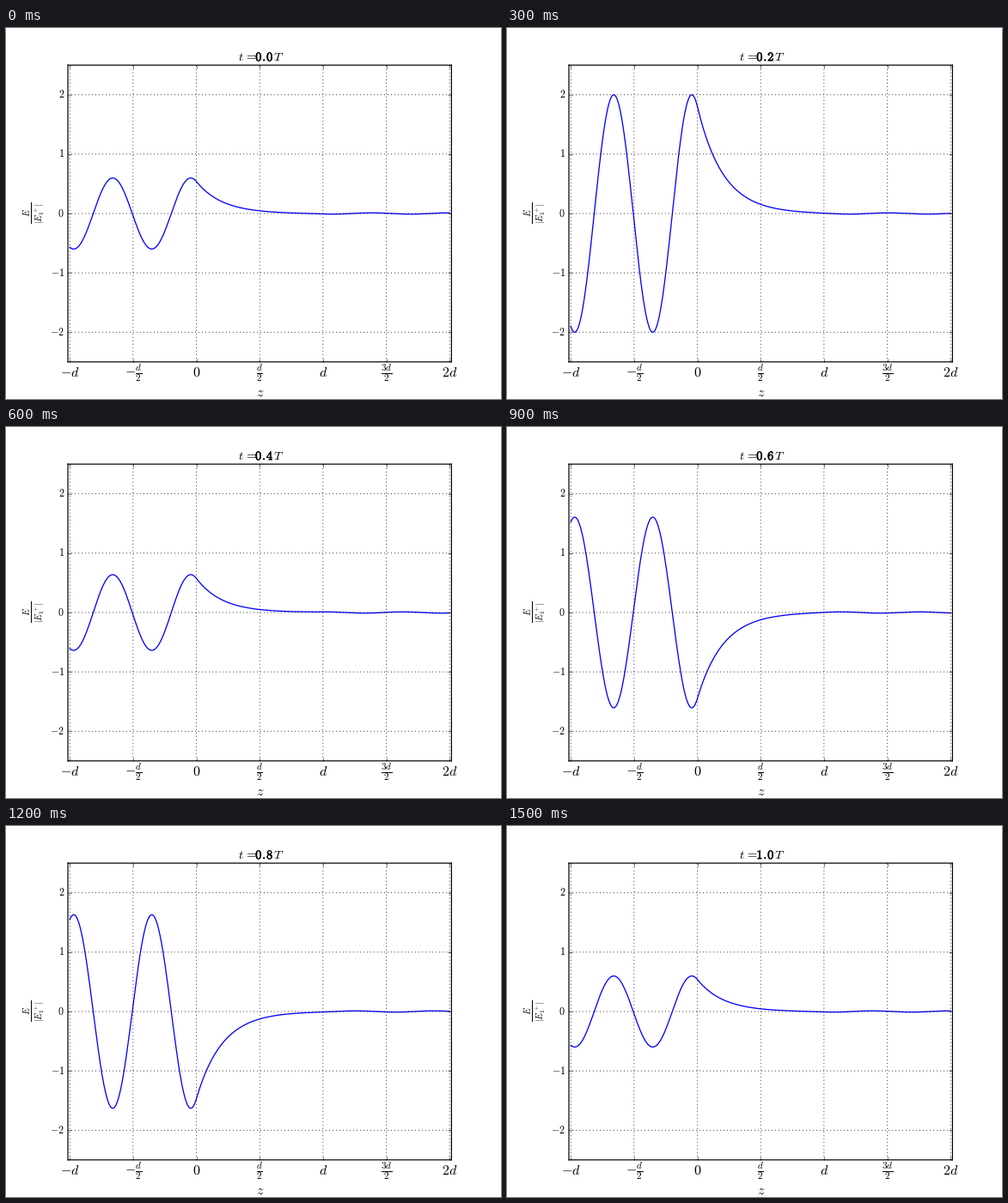
These frames come from a looping animation (576 by 432 pixels, 1.65 s). A matplotlib script:

```python
import numpy as np
import matplotlib.pyplot as plt
from matplotlib import patheffects
from matplotlib.animation import FuncAnimation

plt.style.use("classic")
plt.rcParams.update({
    "figure.facecolor": "white",
    "savefig.facecolor": "white",
    "mathtext.fontset": "cm",
    "path.snap": False,
    "axes.linewidth": 1.2,
    "grid.linewidth": 0.75,
})

WIDTH, HEIGHT = 576, 432
FRAMES = 11
INTERVAL = 150
K = 10.19       # propagating wavenumber, in units of 1/d
KAPPA = 4.91    # decay constant inside the gap
PHASE = 1.716   # phase of the incident wave at z = 0


def complex_field(z):
    """Unit wave tunnelling through an evanescent gap 0 < z < 1."""
    contrast = (KAPPA**2 - K**2) / (2 * K * KAPPA)
    trans = 1 / (np.cosh(KAPPA) + 1j * contrast * np.sinh(KAPPA))
    decaying = trans * (1 - 1j * K / KAPPA) / 2
    growing = trans * (1 + 1j * K / KAPPA) / 2

    def gap(s):
        return (decaying * np.exp(-KAPPA * (s - 1))
                + growing * np.exp(KAPPA * (s - 1)))

    refl = gap(0) - 1
    before = np.exp(1j * K * z) + refl * np.exp(-1j * K * z)
    after = trans * np.exp(1j * K * (z - 1))
    return np.where(z < 0, before, np.where(z < 1, gap(z), after))


def label(x, y, text, size, **kwargs):
    """Place text at pixel coordinates measured from the top left."""
    style = {"ha": "center", "va": "baseline", **kwargs}
    return fig.text(x / WIDTH, 1 - y / HEIGHT, text, fontsize=size, **style)


z = np.linspace(-1, 2, 601)
field = complex_field(z) * np.exp(1j * PHASE)

fig = plt.figure(figsize=(WIDTH / 72, HEIGHT / 72), dpi=72)
ax = fig.add_axes([0.125, 0.1, 0.775, 0.8])
ax.set_xlim(-1.015, 2.015)
ax.set_ylim(-2.5, 2.5)
ax.grid(True)

ax.tick_params(axis="x", pad=16.7)
ax.set_xticks(np.arange(-1, 2.1, 0.5))
ax.set_xticklabels(
    ["$-d$", r"$-\frac{d}{2}$", "$0$", r"$\frac{d}{2}$", "$d$",
     r"$\frac{3d}{2}$", "$2d$"], fontsize=16, va="baseline")
ax.set_yticks(range(-2, 3))
ax.set_yticklabels([f"${n}$" for n in range(-2, 3)], fontsize=12)

label(295.5, 429, "$z$", 16)
label(33, 215.5, r"$\frac{E}{|E_1^+|}$", 15, rotation=90, va="center")

label(270.3, 38.2, r"$t\hspace{0.12}=$", 14.4, ha="left")
label(311.3, 38.2, "$T$", 14.4, ha="left")
number = label(300.9, 38.2, "", 14.4)
number.set_path_effects(
    [patheffects.withStroke(linewidth=0.6, foreground="black")])

curve, = ax.plot(z, field.real, color="blue", lw=1.3)


def update(frame):
    t = frame / (FRAMES - 1)
    curve.set_ydata((field * np.exp(-2j * np.pi * t)).real)
    whole, tenth = f"{t:.1f}".split(".")
    number.set_text(
        rf"${whole}\hspace{{0.066}}.\hspace{{-0.134}}{tenth}$")
    return curve, number


anim = FuncAnimation(fig, update, frames=FRAMES, interval=INTERVAL,
                     repeat=True, repeat_delay=0, blit=False)
plt.show()
```
